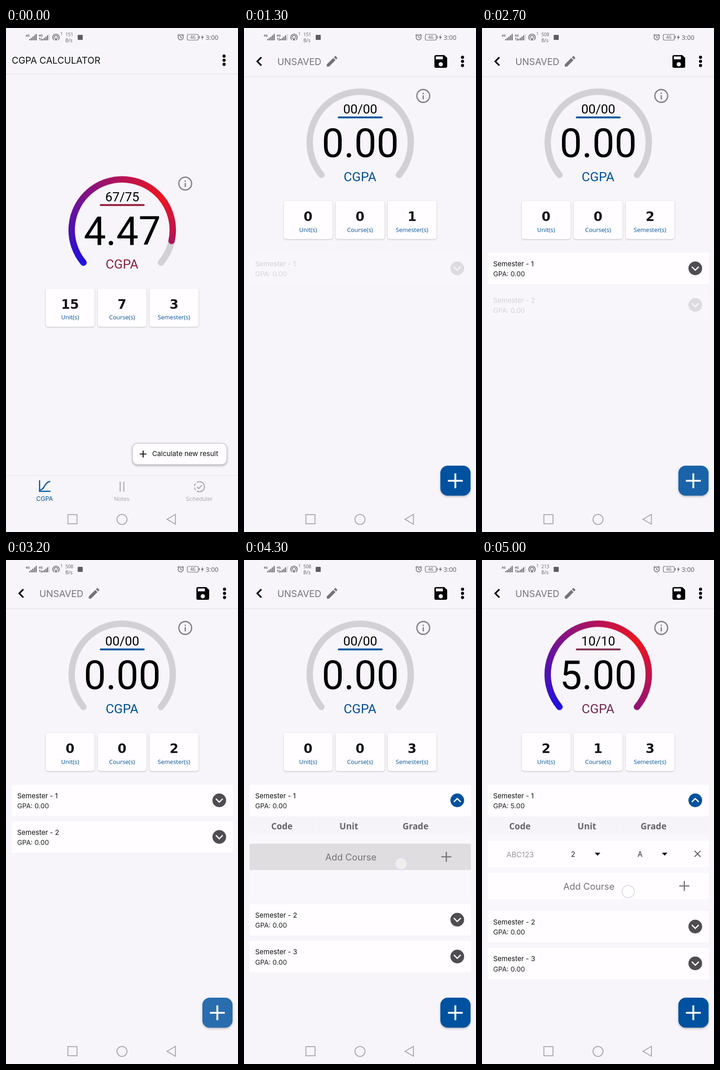
An HTML page with a canvas that plays this animation: 508 px wide and 1102 px high, repeating every 5.1 s.

```html
<!DOCTYPE html>
<html lang="en">
<head>
<meta charset="utf-8">
<title>CGPA Calculator</title>
<style>
html, body { margin: 0; width: 100%; height: 100%; overflow: hidden; background: #f7f5fa; }
canvas { position: absolute; left: 134px; top: 0; }
svg { position: absolute; left: 0; top: 0; font-family: Inter, sans-serif; }
.mid { text-anchor: middle; }
.line { fill: none; stroke-linecap: butt; }
.dial { font-family: Roboto, sans-serif; text-anchor: middle; }
.num { font: bold 28px "DejaVu Sans", sans-serif; fill: #17151a; text-anchor: middle; }
.cap { font: 13px "Open Sans", sans-serif; fill: #00519a; text-anchor: middle; }
.head { font: bold 19px "Open Sans", sans-serif; fill: #676469; text-anchor: middle; }
.stat { font-family: "Noto Sans", sans-serif; fill: #6a686d; }
.card { fill: #fffdff; }
.lift { filter: drop-shadow(0 1px 1.5px rgba(0,0,0,.24)); }
.raise { filter: drop-shadow(0 2px 2px rgba(0,0,0,.28)); }
</style>
</head>
<body>
<canvas id="arc" width="240" height="240"></canvas>
<svg width="508" height="1102" viewBox="0 0 508 1102">
  <defs>
    <clipPath id="navClip"><path d="M0 0H508V1047H0z"/></clipPath>
    <clipPath id="btnClip"><rect x="278" y="909" width="205" height="45" rx="10"/></clipPath>
    <clipPath id="panelClip"><rect id="panelBox" x="12" y="560" width="485" height="0"/></clipPath>
  </defs>

  <!-- status bar -->
  <g class="stat">
    <g font-size="7" font-weight="700"><text x="43" y="19">4G</text><text x="71.500" y="19">4G</text></g>
    <path d="M52 27V24M55.500 27V21.500M59 27V19M62.500 27V16M66 27V13M80.500 27V24M84 27V21.500M87.500 27V19M91 27V16" stroke="#6a686d" stroke-width="2.300"/>
    <path d="M94.500 27V13" stroke="#c9c6cc" stroke-width="1.500"/>
    <path d="M74.500 27V22M72.800 23.500L74.500 21.500M77.500 21.500V27L79 25" class="line" stroke="#6a686d" stroke-width="1.200"/>
    <g class="line" stroke="#6a686d" stroke-width="1.600">
      <path d="M105 26.300A7.300 7.300 0 1 1 114 26.300M106.500 23.500A4.200 4.200 0 1 1 112.500 23.500"/>
    </g>
    <path d="M109.500 19.500L112 27H107z"/>
    <text x="119" y="16" font-size="9">1</text>
    <text id="speed" x="130" y="18" font-size="10">151</text>
    <text x="130" y="31" font-size="10.500">B/s</text>
    <rect x="157" y="15" width="11" height="11" rx="1" fill="#5f5d62"/>
    <g class="line" stroke="#6a686d" stroke-width="1.500">
      <circle cx="382.500" cy="20.500" r="5.600"/>
      <path d="M382.500 17V20.500L385 22M375.500 16.500L379 13.500M389.500 16.500L386 13.500"/>
      <rect x="397" y="14" width="24" height="12.500" rx="2.500" stroke-width="1.200"/>
    </g>
    <path d="M422.500 17.500h1.500v5.500h-1.500zM431 14L427 21.500H430L428.500 27L433 19H430z"/>
    <text x="409" y="24" font-size="10.500" class="mid">46</text>
    <text x="437" y="25.500" font-size="14.200">3:00</text>
  </g>

  <!-- dial and totals, shared by both screens -->
  <g id="dial">
    <g class="line" stroke="#858287" stroke-width="2.800">
      <circle cx="392.500" cy="148.500" r="14"/><path d="M392.500 147V156M392.500 141.500V144.500"/>
    </g>
    <text id="ratio" class="dial" x="254.500" y="187" font-size="28"></text>
    <path id="bar" d="M207.500 195.500H301.500" stroke-width="4.200" stroke-linecap="round"/>
    <text id="score" class="dial" x="254.500" y="282" font-size="86.500"></text>
    <text id="unitLabel" class="dial" x="254" y="334.500" font-size="28">CGPA</text>
    <g id="totals"></g>
  </g>

  <!-- first screen -->
  <g id="home">
    <text x="12.500" y="77.500" font-size="20.200" fill="#111">CGPA CALCULATOR</text>
    <g><circle cx="477.500" cy="61.500" r="3.400"/><circle cx="477.500" cy="70.500" r="3.400"/><circle cx="477.500" cy="79.500" r="3.400"/></g>
    <path d="M0 100.500H508" stroke="#e4e1e7" stroke-width="1.500"/>
    <g clip-path="url(#navClip)"><g id="nav">
      <path d="M0 978.500H508" stroke="#e9e6ec" stroke-width="1.500"/>
      <g class="line" stroke="#00519a" stroke-width="2.500">
        <path d="M73.500 989V1013H97.500M75 1010C82 1009 83 1003 86 999S91 992 97 991.500"/>
      </g>
      <g class="line" stroke="#aeabb1" stroke-width="2.400">
        <path d="M250 992V1013.500M258 992V1013.500M423.500 992A11 11 0 0 1 423.500 1014M418 1003L422 1007L429 999.500"/>
        <path d="M423.500 1014A11 11 0 0 1 423.500 992" stroke-dasharray="6 3.400"/>
      </g>
      <text x="84.500" y="1034" font-size="13.400" fill="#00519a" class="mid">CGPA</text>
      <g font-size="12.300" fill="#aeabb1" class="mid"><text x="253.500" y="1034">Notes</text><text x="423" y="1034">Scheduler</text></g>
    </g></g>
    <g id="calc">
      <rect class="raise" x="277" y="908" width="206.500" height="46.500" rx="11" fill="#fffdff" stroke="#d0cdd3" stroke-width="1.600"/>
      <path d="M293 931.500H307.500M300.250 924V939" stroke="#111" stroke-width="2.200"/>
      <text x="320" y="936.300" font-size="15.100" fill="#111">Calculate new result</text>
      <g clip-path="url(#btnClip)"><circle id="ripple" cx="422" cy="931" fill="#d2d0d5"/></g>
    </g>
  </g>

  <!-- second screen -->
  <g id="edit">
    <path d="M38 64L29 73L38 82" class="line" stroke="#000" stroke-width="3.400"/>
    <text x="73" y="81" font-size="20.200" fill="#757277">UNSAVED</text>
    <path transform="translate(177.500 57.500) scale(1.280)" fill="#757277" d="M3 17.250V21h3.750L17.810 9.940l-3.750-3.750L3 17.250zM20.710 7.040c.39-.39.39-1.020 0-1.410l-2.340-2.340c-.39-.39-1.020-.39-1.410 0l-1.830 1.830 3.750 3.750 1.830-1.830z"/>
    <path transform="translate(412.300 54.500) scale(1.550)" d="M17 3H5c-1.110 0-2 .9-2 2v14c0 1.100.89 2 2 2h14c1.100 0 2-.9 2-2V7l-4-4zm-5 16c-1.660 0-3-1.340-3-3s1.340-3 3-3 3 1.340 3 3-1.340 3-3 3zm3-10H5V5h10v4z"/>
    <g><circle cx="478.500" cy="64" r="3.400"/><circle cx="478.500" cy="73" r="3.400"/><circle cx="478.500" cy="82" r="3.400"/></g>
    <path d="M0 106.500H508" stroke="#e4e1e7" stroke-width="1.500"/>
    <g clip-path="url(#panelClip)">
      <path d="M12 560H497V980H12z" fill="#f9f7fb"/>
      <path d="M12 561H157V601H12zM158.500 561H303V601H158.500zM304.500 561H450V601H304.500zM451.500 561H497V601H451.500z" fill="#f6f4f8"/>
      <text class="head" x="83" y="588.500">Code</text><text class="head" x="229.500" y="588.500">Unit</text><text class="head" x="375.500" y="588.500">Grade</text>
      <g id="course">
        <path class="card" d="M12 614H497V672H12z"/>
        <text x="83.500" y="650" font-size="16.200" fill="#98959b" class="mid">ABC123</text>
        <g font-size="15.500" fill="#222" class="mid"><text x="199.500" y="648.700">2</text><text x="346" y="648.700">A</text></g>
        <path d="M247 640H259L253 646.500zM394 640H406L400 646.500z"/>
        <path d="M465.500 636L478.500 649M478.500 636L465.500 649" stroke="#555257" stroke-width="1.800"/>
      </g>
      <g id="add">
        <rect class="card" x="12" width="485" height="57.500" rx="3"/>
        <rect id="addTint" x="12" width="485" height="57.500" rx="3"/>
        <text x="234" y="36.500" font-size="20" fill="#757277" class="mid">Add Course</text>
        <path d="M432 28.700H454M443 17.700V39.700" stroke="#757277" stroke-width="2.600"/>
      </g>
    </g>
    <g id="list"></g>
    <rect class="raise" x="430" y="957" width="66" height="65.500" rx="16" fill="#00519f"/>
    <rect id="fabTint" x="430" y="957" width="66" height="65.500" rx="16" fill="#fff"/>
    <path d="M446.500 990H479M462.750 973.700V1006.300" stroke="#fff" stroke-width="4"/>
  </g>

  <g class="line" stroke="#aaa7ad" stroke-width="2">
    <rect x="135.500" y="1064" width="20" height="20"/><circle cx="254" cy="1074.500" r="11"/>
    <path d="M371 1063.500V1085L352.500 1074.200z"/>
  </g>
  <circle id="touch" r="13.500" fill="#fff" fill-opacity=".5" stroke="#dcd7e8" stroke-width="1.800"/>
</svg>
<script>
const $ = id => document.getElementById(id);
const LOOP = 5100, RAD = Math.PI / 180;
const BLUE = [0, 81, 154];

$('totals').innerHTML = ['Unit(s)', 'Course(s)', 'Semester(s)'].map((name, i) => {
  const x = 87 + i * 113.8, c = x + 53.3;
  return `<rect class="card lift" x="${x}" y="378" width="107" height="83.500" rx="5"/>
    <text class="num" x="${c}" y="422">0</text><text class="cap" x="${c}" y="445.500">${name}</text>`;
}).join('');

$('list').innerHTML = [1, 2, 3].map(n => `<g>
  <rect class="card" x="12" width="485" height="68.500" rx="2"/>
  <text x="24.500" y="29" font-size="15" fill="#111">Semester - ${n}</text>
  <text class="gpa" x="24.500" y="51.500" font-size="14.800" fill="#222">GPA: 0.00</text>
  <circle cx="467" cy="34" r="15" fill="#4f4d51"/>
  <path class="line" d="M459.500 30.500L467 38L474.500 30.500" stroke="#fff" stroke-width="2.600"/></g>`).join('');

const cards = [...$('list').children];
const nums = [...document.querySelectorAll('.num')];
const gpa = document.querySelector('.gpa');
const ctx = $('arc').getContext('2d');

// Piecewise linear track of [time, value] pairs
function track(t, keys) {
  let [t0, v0] = keys[0];
  for (const [t1, v1] of keys) {
    if (t < t1) return t <= t0 ? v0 : v0 + (v1 - v0) * (t - t0) / (t1 - t0);
    [t0, v0] = [t1, v1];
  }
  return v0;
}
const fadeIn = (t, s) => track(t, [[s - 100, 0], [s, .15], [s + 100, .45], [s + 300, 1]]);
const mix = (a, b, k) => `rgb(${a.map((v, i) => Math.round(v + (b[i] - v) * k))})`;
const move = (el, y) => el.setAttribute('transform', `translate(0 ${y})`);
const show = (el, on) => el.style.display = on ? '' : 'none';

const taps = [[500, 800, 422, 929], [2200, 2400, 462, 988], [2900, 3100, 462, 988],
  [3600, 3800, 425, 521], [4200, 4400, 344, 664], [5000, 5100, 320, 725]];

function drawArc(part) {
  ctx.clearRect(0, 0, 240, 240);
  ctx.lineWidth = 14;
  ctx.lineCap = 'round';
  const stroke = (style, k) => {
    ctx.strokeStyle = style;
    ctx.beginPath();
    ctx.arc(120.5, 120.5, 110.7, 140 * RAD, (140 + 260 * k) * RAD);
    ctx.stroke();
  };
  stroke('#d2d0d5', 1);
  if (part <= 0) return;
  const g = ctx.createConicGradient(140 * RAD, 120.5, 120.5);
  g.addColorStop(0, '#2010e0');
  g.addColorStop(.5, '#ee1520');
  g.addColorStop(1, '#2010e0');
  stroke(g, part);
}

function render(t) {
  const home = t < 1200, added = t >= 4500;
  show($('home'), home);
  show($('edit'), !home);
  $('speed').textContent = t < 2000 ? 151 : t < 4800 ? 508 : 213;

  // dial
  const slide = track(t, [[400, 0], [500, .45], [600, 1]]);
  const y = home ? 191.7 + 34.8 * slide : 0;
  move($('dial'), y);
  $('arc').style.transform = `translateY(${y + 129.5}px)`;
  const part = home ? 4.47 / 5 : track(t, [[4400, 0], [4600, .4], [4800, .85], [5000, 1]]);
  drawArc(part);
  $('score').textContent = (part * 5).toFixed(2);
  $('ratio').textContent = home ? '67/75' : added ? '10/10' : '00/00';
  const tone = home ? 1 : part * .8;
  $('bar').style.stroke = mix(BLUE, [155, 36, 62], tone);
  $('unitLabel').style.fill = mix(BLUE, [139, 36, 60], tone);
  const sems = t < 2700 ? 1 : t < 3300 ? 2 : 3;
  (home ? [15, 7, 3] : [added ? 2 : 0, added ? 1 : 0, sems]).forEach((v, i) => nums[i].textContent = v);
  gpa.textContent = added ? 'GPA: 5.00' : 'GPA: 0.00';

  // first screen
  move($('nav'), 68 * slide);
  move($('calc'), 67.5 * slide);
  $('ripple').setAttribute('r', track(t, [[400, 0], [500, 60], [600, 136], [700, 165]]));
  $('ripple').style.opacity = track(t, [[700, .53], [1000, 0]]);

  // semester list
  const grow = track(t, [[3500, 0], [3600, 14], [3700, 46], [3800, 98], [3900, 126],
    [4200, 126], [4300, 181], [4400, 193], [4500, 196]]);
  const tops = [491.5, 571.5 + grow, 652 + grow];
  const starts = [1300, 2700, 3300];
  cards.forEach((c, i) => {
    move(c, tops[i]);
    c.style.opacity = fadeIn(t, starts[i]);
  });
  const [dot, chevron] = [cards[0].children[3], cards[0].children[4]];
  dot.setAttribute('fill', t >= 3600 ? '#00519f' : '#4f4d51');
  chevron.setAttribute('transform',
    `rotate(${track(t, [[3500, 0], [3600, 15], [3700, 53], [3800, 135], [3900, 180]])} 467 34)`);
  $('panelBox').setAttribute('height', Math.max(0, grow - (grow < 12 ? grow : 0)));
  move($('add'), track(t, [[4200, 614], [4300, 620.3], [4400, 645], [4500, 672], [4600, 684]]));
  $('addTint').style.opacity = track(t, [[4100, 0], [4200, .08], [4300, .125], [4400, .1], [4700, 0]]);
  $('course').style.opacity = track(t, [[4400, 0], [4500, .15], [4600, .5], [4800, 1]]);
  $('fabTint').style.opacity = track(t, [[2100, 0], [2400, .2], [2600, .16], [2700, .1], [2800, 0],
    [2900, .08], [3100, .2], [3300, .12], [3500, 0]]);

  const tap = taps.find(([a, b]) => t >= a && t < b);
  show($('touch'), tap);
  if (tap) $('touch').setAttribute('transform', `translate(${tap[2]} ${tap[3]})`);
}

let start, last;
function tick(now) {
  start ??= now;
  const t = Math.floor((now - start) % LOOP / 100) * 100;
  if (t !== last) render(last = t);
  requestAnimationFrame(tick);
}
render(0);
requestAnimationFrame(tick);
</script>
</body>
</html>
```
